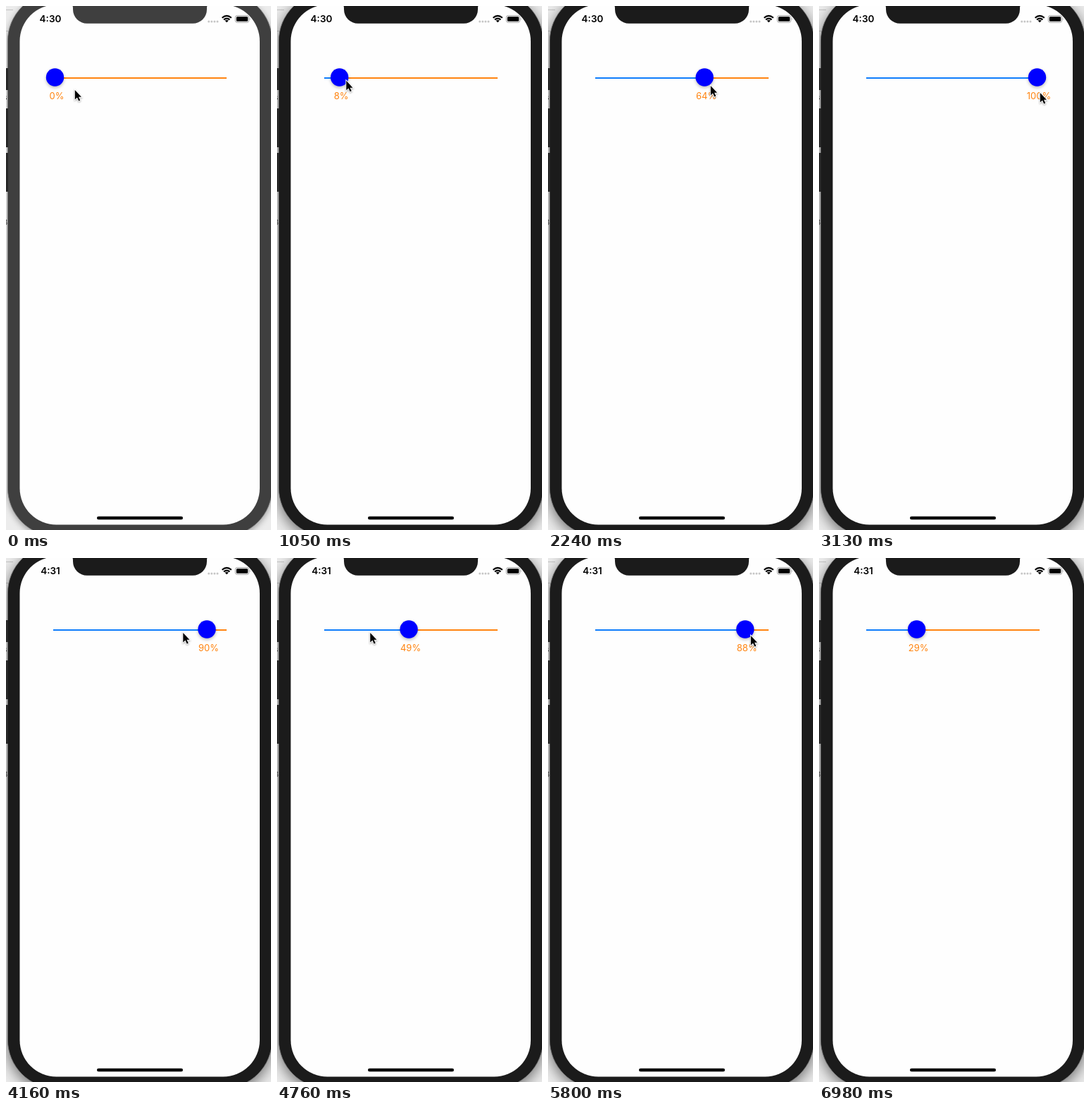
An HTML page for the animation above (7730 ms loop, 376 by 742 pixels).

```html
<!DOCTYPE html>
<html lang="en">
<head>
<meta charset="utf-8">
<title>Slider</title>
<style>
  html, body { margin: 0; width: 100%; height: 100%; overflow: hidden; background: #ececec; }
  svg { display: block; width: 376px; height: 742px; font-family: Inter, Roboto, sans-serif; }
  text { text-anchor: middle; }
  .body { stroke: #777; stroke-width: .8; filter: drop-shadow(0 3px 4px #0005); }
  .body, .notch { fill: #3f3f3f; }
  .active .body { filter: drop-shadow(0 6px 10px #0008); }
  .active .body, .active .notch { fill: #1b1b1b; }
  #thumb { fill: #00f; filter: drop-shadow(0 2.5px 2px #0004); }
  #cursor { stroke: #fff; stroke-width: 1.8; paint-order: stroke; filter: drop-shadow(0 1px 1px #0005); }
</style>
</head>
<body>
<svg id="stage" viewBox="0 0 376 742">
  <path d="M0 5.5H10M0 35.5H3" stroke="#c4c4c4"/>
  <rect class="body" x="2.4" y="-19" width="375.2" height="770" rx="69"/>
  <path d="M0 88H3V119H0ZM0 145H3V200H0ZM0 208H3V263H0Z" fill="#292929"/>
  <g font-size="10" fill="#333"><text x="-1" y="133">s</text><text x="-1" y="310">3</text></g>
  <rect x="19.5" y="-2" width="340.5" height="736.5" rx="52" fill="#fefefe"/>
  <path class="notch" d="M90-3Q95-3 95 3V4.800A20 20 0 0 0 115 24.800H265A20 20 0 0 0 285 4.800V3Q285-3 290-3Z"/>

  <text id="clock" x="63" y="23.2" font-size="13.5" font-weight="600"></text>
  <path d="M287.7 22h12.5" stroke="#c6c6c6" stroke-width="3" stroke-linecap="round" stroke-dasharray="0 4.1"/>
  <g fill="none" stroke="#000" stroke-width="2.1">
    <path d="M306.600 16.800Q313.200 10.900 319.800 16.800M309 19.400Q313.200 15.700 317.400 19.400"/>
    <path d="M310.700 20.700Q313.200 18.900 315.700 20.700L313.200 23.300Z" fill="#000" stroke="none"/>
  </g>
  <rect x="325.3" y="13.5" width="19.4" height="9.8" rx="2.8" fill="none" stroke="#999" stroke-width=".9"/>
  <rect x="326.8" y="15" width="16.4" height="6.8" rx="1.5"/>
  <path d="M345.900 16.800q1.500 1.600 0 3.200z" fill="#888"/>
  <rect x="129" y="722.7" width="122" height="4.6" rx="2.3"/>

  <path d="M67 102H313" stroke="#ff8410" stroke-width="2"/>
  <path id="fill" stroke="#0f7dfb" stroke-width="2"/>
  <circle id="thumb" cy="101" r="12.7"/>
  <text id="label" y="132.3" font-size="13" fill="#ff8410"></text>
  <path id="cursor" d="M.8 1V14.500L3.900 11.600L6.200 16.500L8.300 15.500L6 10.800H10Z"/>
</svg>
<script>
const LOOP = 7730, TICK = 148.6;
const el = id => document.getElementById(id);
const [stage, clock, fill, thumb, label, cursor] =
  ['stage', 'clock', 'fill', 'thumb', 'label', 'cursor'].map(el);

// Key points: tick, then values; straight moves between them.
const pointer = [
  [0, 97, 118], [3, 71, 104], [6, 71, 104], [12, 230, 109], [14, 230, 109],
  [15, 230, 112], [21, 313, 122], [22, 313, 122], [25, 310, 105], [26, 310, 105],
  [34, 72, 105], [39, 287, 109], [41, 287, 109], [45, 140, 110], [47, 524, 966]
];
const slider = [
  [6, 0], [7, 8], [13, 63.6], [15, 63.6], [21, 100], [27, 100], [32, 49],
  [34, 0], [35, 0], [39, 87.6], [41, 87.6], [45, 28.8]
];

function at(keys, k) {
  const i = keys.findIndex(key => key[0] > k);
  if (i < 1) return keys.at(i).slice(1);
  const [a, b] = [keys[i - 1], keys[i]];
  const u = (k - a[0]) / (b[0] - a[0]);
  return a.map((v, j) => v + (b[j] - v) * u).slice(1);
}

function draw(t) {
  const k = Math.floor((t % LOOP + 5) / TICK);
  const [x, y] = at(pointer, k);
  const [percent] = at(slider, k);
  const pos = 69.5 + 2.4 * percent;
  stage.classList.toggle('active', k >= 7);
  clock.textContent = k < 24 ? '4:30' : '4:31';
  fill.setAttribute('d', `M67 102H${pos}`);
  thumb.setAttribute('cx', pos);
  label.setAttribute('x', pos + 2.5);
  label.textContent = Math.round(percent) + '%';
  cursor.setAttribute('transform', `translate(${x} ${y})`);
}

const start = performance.now();
function loop() {
  draw(performance.now() - start);
  requestAnimationFrame(loop);
}
loop();
</script>
</body>
</html>
```
